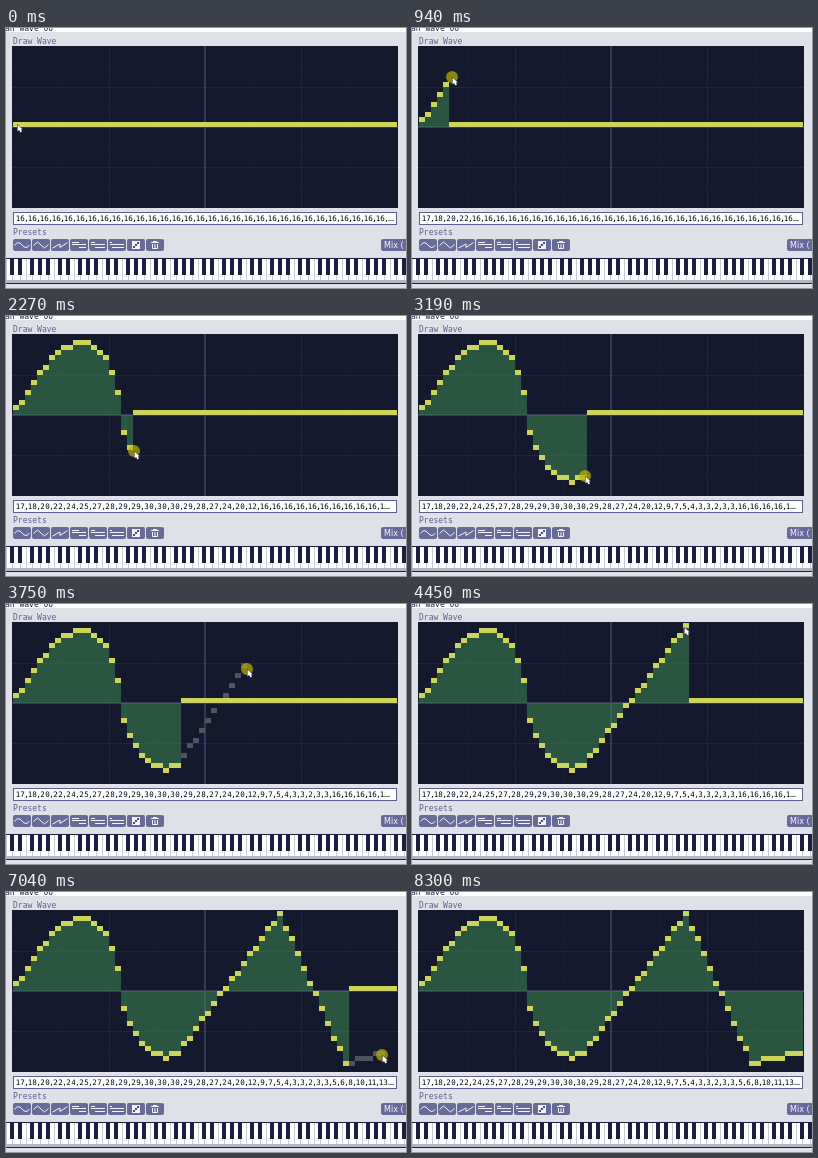
Write an HTML page with a canvas that moves like this. It is 400x260 px and loops after 9340 ms.

```html
<!DOCTYPE html>
<html>
<head>
<meta charset="utf-8">
<style>
html, body { margin: 0; overflow: hidden; background: #e0e0e8 }
canvas { display: block }
</style>
</head>
<body>
<canvas id="stage" width="400" height="260"></canvas>
<script>
const LOOP = 9340, MID = 99, COLS = 64, DRAWN = 28;
const INK = '#1c2040', BLUE = '#5c5f8e', BUTTON = '#686b98', PALE = '#f4f4fa';
const c = document.getElementById('stage').getContext('2d');

// pointer moves: start, end, target x and y; it rests in between
const moves = [
  [520, 1360, 68, 27], [1360, 2270, 128, 135], [2270, 2830, 173, 160],
  [3260, 3970, 272, 23],
  [4730, 5290, 341, 180], [5290, 5570, 343, 172],
  [6690, 7040, 376, 163], [7040, 7530, 389, 185], [7530, 8230, 386, 196]
];
// straight strokes, each from the end of the one before
const strokes = [
  { press: 3190, release: 4450, col: 44, level: 31 },
  { press: 4800, release: 5990, col: 55, level: 1 },
  { press: 6550, release: 7670, col: 63, level: 3 }
];
strokes.forEach((s, i) => s.from = strokes[i - 1] || { col: DRAWN - 1, level: 3 });

const lerp = (a, b, k) => a + (b - a) * k;
const clamp = (v, lo, hi) => Math.max(lo, Math.min(hi, v));
const colX = i => 7 + i * 6;
const levelY = v => 94 - (v - 16) * 5;
const held = (s, t) => t >= s.press && t < s.release;

// a sine rise, a steepening fall, a parabolic trough
function freehand(i) {
  if (i <= 11) return 16.5 + 13.5 * Math.sin(Math.PI / 2 * i / 11);
  if (i <= 17) return 30 - 10 * ((i - 11) / 6) ** 2.7;
  return 2.33 + 9.65 * ((25 - i) / 7) ** 2;
}

function rect(color, x, y, w, h) {
  c.fillStyle = color;
  c.fillRect(x, y, w, h);
}

function label(s, x, y, color, font = '"DejaVu Sans Mono", monospace') {
  c.font = '8px ' + font;
  c.textAlign = 'left';
  c.fillStyle = color;
  c.fillText(s, x, y);
}

function pointer(t) {
  let x = 11, y = 96;
  for (const [start, end, tx, ty] of moves) {
    const k = clamp((t - start) / (end - start), 0, 1);
    x = lerp(x, tx, k);
    y = lerp(y, ty, k);
  }
  if (t >= 590 && t < 2830) y = levelY(freehand(Math.max(0, (x - 10) / 6))) + 1;
  return [x, y];
}

function eachOnLine(from, col, level, put) {
  for (let i = from.col + 1; i <= col; i++) {
    const v = lerp(from.level, level, (i - from.col) / (col - from.col));
    put(i, clamp(Math.round(v), 0, 31));
  }
}

function samples(t) {
  let drawn = t < 590 ? 0 : Math.min(DRAWN, Math.floor((pointer(t)[0] - 5) / 6));
  const out = Array.from({ length: COLS }, (_, i) => i < drawn ? Math.round(freehand(i)) : 16);
  for (const s of strokes.filter(s => t >= s.release)) {
    eachOnLine(s.from, s.col, s.level, (i, v) => out[i] = v);
    drawn = s.col + 1;
  }
  return { out, drawn };
}

function plot(t) {
  rect('#14192d', 6, 18, 386, 162);
  for (let k = 1; k < 8; k++) {
    const color = k % 2 ? '#181d32' : '#20253b';
    rect(color, 7 + k * 48, 18, 1, 162);
    rect(color, 6, 19 + k * 20, 386, 1);
  }
  rect('#343959', 6, 98, 386, 2);
  rect('#343959', 198, 18, 2, 162);

  const { out, drawn } = samples(t);
  for (let i = 0; i < drawn; i++) {
    const y = levelY(out[i]) + 2;
    rect('rgba(60,130,80,.58)', colX(i), Math.min(y, MID), 6, Math.abs(MID - y));
  }
  const [x, y] = pointer(t);
  for (const s of strokes.filter(s => held(s, t)))
    eachOnLine(s.from, Math.floor((x - 8) / 6), (179 - y) / 5,
      (i, v) => rect('#50525f', colX(i), levelY(v), 6, 5));
  out.forEach((v, i) => rect('#cdd45c', colX(i), levelY(v), 6, 5));
}

function valueBox(t) {
  rect(BLUE, 7, 184, 384, 13);
  rect('#fff', 8, 185, 382, 11);
  const advance = ch => ({ '1': 4, ',': 3, '.': 2 })[ch] || 5;
  let width = 0, s = '';
  for (const ch of samples(t - 70).out.join()) {
    width += advance(ch);
    if (width > 372) break;
    s += ch;
  }
  c.font = '7.5px "DejaVu Sans Mono", monospace';
  c.textAlign = 'center';
  c.fillStyle = '#000018';
  let x = 10;
  for (const ch of s + '...') {
    c.fillText(ch, x + advance(ch) / 2, 193);
    x += advance(ch);
  }
}

function button(x, w, icon = '') {
  c.save();
  c.translate(x, 211);
  c.fillStyle = BUTTON;
  c.beginPath();
  c.roundRect(0, 0, w, 12, 2);
  c.fill();
  c.strokeStyle = PALE;
  c.stroke(new Path2D(icon));
  c.restore();
}

function toolbar() {
  const pulse = w => `M2 3.5h${w}M2 5.5h14M${2 + w} 8.5H16`;
  const icons = [
    'M1.5 6.5Q5 1 9 6T16.5 6',
    'M1.5 6.5L5.5 3L12.5 9L16.5 5.5',
    'M1.5 9L9 5V8.5L16.5 3.5',
    pulse(7), pulse(4), pulse(2), '',
    'M5 3.5h8M7 2.5h4M6.5 5v4.5h5V5M9 5v4'
  ];
  label('Presets', 7, 207, BLUE);
  icons.forEach((icon, i) => button(7 + i * 19, 18, icon));
  rect(PALE, 126, 213, 8, 8);
  for (let k = 0; k < 3; k++) rect('#4c4f7c', 131 - k * 2, 214 + k * 2, 2, 2);
  button(375, 30);
  label('Mix (', 378, 220, PALE, '"DejaVu Sans", sans-serif');
}

// semitones of equal width
function piano() {
  rect('#fff', 0, 230, 400, 23);
  rect(INK, 0, 230, 400, 1);
  rect('#b4b6c8', 0, 252, 400, 3);
  rect(INK, 0, 255, 400, 1);
  for (let i = 0; i < 100; i++) {
    const note = i % 12, x = i * 4;
    if (note == 5 || note == 0) rect('#c8cadc', x, 231, 1, 21);
    else if ((note < 5) == (note % 2 == 1)) {
      rect('#c8cadc', x + 2, 247, 1, 5);
      rect(INK, x, 231, 4, 16);
    }
  }
}

function cursor(t) {
  if (t >= 8300) return;
  const [x, y] = pointer(t).map(Math.round);
  if (t >= 390 && t < 2830 || strokes.some(s => held(s, t))) {
    c.fillStyle = 'rgba(190,180,0,.7)';
    c.beginPath();
    c.arc(x, y, 6, 0, 7);
    c.fill();
  }
  const arrow = new Path2D(`M${x + .5} ${y + .5}v7l1.5 -1.5l1.5 2.5l1.5 -1l-1.2 -2h2z`);
  c.strokeStyle = '#101018';
  c.stroke(arrow);
  c.fillStyle = '#fff';
  c.fill(arrow);
}

function draw(t) {
  rect('#e0e0e8', 0, 0, 400, 260);
  rect('#fff', 0, 0, 400, 4);
  label('an wave 00', -1, 3, INK);
  label('Draw Wave', 7, 16, BLUE);
  plot(t);
  valueBox(t);
  toolbar();
  piano();
  cursor(t);
}

const begin = performance.now();
function tick() {
  draw((performance.now() - begin) % LOOP);
  requestAnimationFrame(tick);
}
tick();
</script>
</body>
</html>
```
